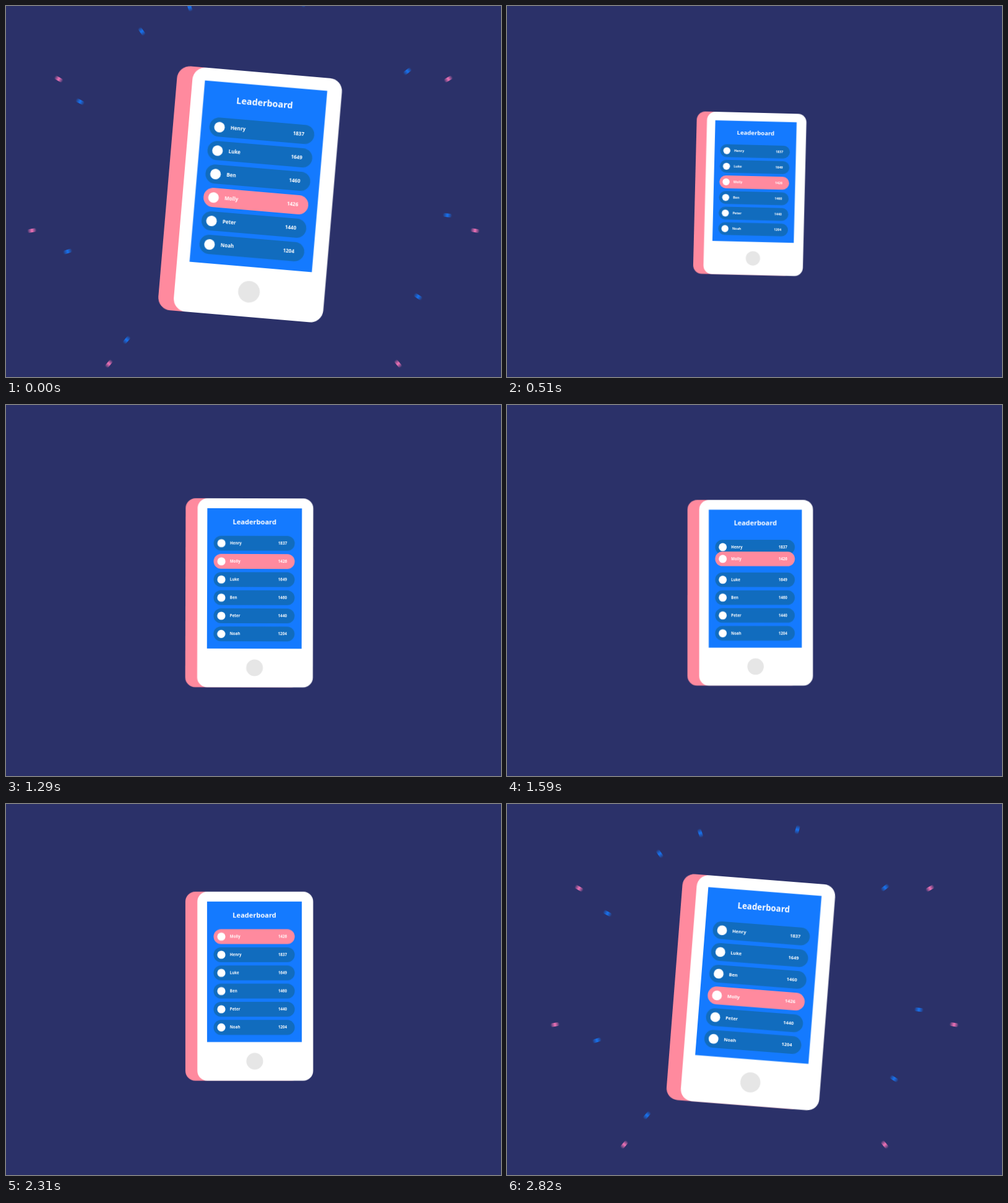
An HTML page that plays this animation: 800x600 px, repeating every 2850 ms.

```html
<!DOCTYPE html>
<html lang="en">
<head>
<meta charset="utf-8">
<title>Leaderboard</title>
<style>
  html, body { margin: 0; width: 100%; height: 100%; overflow: hidden; background: #2b3169; }
  svg { display: block; width: 800px; height: 600px; }
  text { font-family: "Open Sans", "Noto Sans", sans-serif; font-weight: 700; fill: #fff; }

  /* The cycle begins with the pop-in, 305 ms before the page's first picture. */
  .anim {
    --sine: cubic-bezier(.364, 0, .636, 1);
    animation: 2850ms var(--sine) -305ms infinite both;
  }
  .zoom, .tilt { transform-origin: 388px 303px; }
  .zoom { animation-name: zoom; }
  .tilt { animation-name: tilt; }
  .drop { animation-name: drop, smear; }
  .climb { animation-name: climb; }
  .yield1 { animation-name: yield1; }
  .yield2 { animation-name: yield2; }
  .yield3 { animation-name: yield3; }
  .pink { animation-name: flyPink; }
  .blue { animation-name: flyBlue; }

  @keyframes zoom {
    0% { transform: scale(0); }
    12.46% { transform: scale(1.36); }
    29.65% { transform: scale(.855); }
    45.79% { transform: scale(1.064); }
    61.58% { transform: scale(.975); }
    77.37% { transform: scale(1.011); }
    94.91%, 100% { transform: scale(1); }
  }
  @keyframes tilt {
    0% { transform: rotate(0deg); }
    12.81% { transform: rotate(5.2deg); animation-timing-function: cubic-bezier(.4, 0, .6, .85); }
    28.6% { transform: rotate(1.4deg); animation-timing-function: linear; }
    43.33% { transform: rotate(.65deg); animation-timing-function: linear; }
    55.96% { transform: rotate(.15deg); animation-timing-function: ease-out; }
    70.35%, 100% { transform: rotate(0deg); }
  }
  @keyframes drop {
    0%, 85.96% { transform: translateY(0); animation-timing-function: cubic-bezier(.3333, 0, .6667, -.3); }
    100% { transform: translateY(479px); }
  }
  @keyframes smear {
    0% { filter: none; animation-timing-function: step-end; }
    95.6% { filter: url(#soft); animation-timing-function: step-end; }
    98.2%, 100% { filter: url(#hard); animation-timing-function: step-end; }
  }

  @keyframes climb {
    0%, 17.37% { transform: translateY(0); }
    27.89%, 40.53% { transform: translateY(-29.35px); }
    51.05%, 63.68% { transform: translateY(-58.7px); }
    74.21%, 100% { transform: translateY(-88.05px); }
  }
  @keyframes yield1 {
    0%, 17.37% { transform: translateY(0); }
    27.89%, 100% { transform: translateY(29.35px); }
  }
  @keyframes yield2 {
    0%, 40.53% { transform: translateY(0); }
    51.05%, 100% { transform: translateY(29.35px); }
  }
  @keyframes yield3 {
    0%, 63.68% { transform: translateY(0); }
    74.21%, 100% { transform: translateY(29.35px); }
  }

  @keyframes flyPink {
    0% { transform: translateX(0); opacity: 0; animation-timing-function: step-end; }
    .6% { transform: translateX(0); opacity: 1; animation-timing-function: cubic-bezier(.333, .31, .667, 1); }
    17.23% { transform: translateX(486px); opacity: 1; animation-timing-function: step-end; }
    17.3%, 100% { transform: translateX(486px); opacity: 0; }
  }
  @keyframes flyBlue {
    0% { transform: translateX(0); opacity: 1; }
    21.05% { transform: translateX(612px); opacity: 1; animation-timing-function: step-end; }
    21.1%, 100% { transform: translateX(612px); opacity: 0; }
  }
</style>
</head>
<body>
<svg viewBox="0 0 800 600">
  <defs>
    <filter id="soft"><feGaussianBlur stdDeviation="0 3"/></filter>
    <filter id="hard"><feGaussianBlur stdDeviation="0 5.5"/></filter>
    <linearGradient id="pinkFade">
      <stop offset="0" stop-color="#f272b6" stop-opacity=".1"/>
      <stop offset=".5" stop-color="#f272b6"/>
      <stop offset="1" stop-color="#f272b6" stop-opacity=".1"/>
    </linearGradient>
    <linearGradient id="blueFade">
      <stop offset="0" stop-color="#147aff" stop-opacity=".1"/>
      <stop offset=".5" stop-color="#147aff" stop-opacity=".9"/>
      <stop offset="1" stop-color="#147aff" stop-opacity=".1"/>
    </linearGradient>
  </defs>

  <rect width="800" height="600" fill="#2b3169"/>
  <g id="confetti" transform="translate(400 300)"></g>

  <g class="anim drop">
    <g class="anim tilt">
      <g class="anim zoom">
        <rect x="290" y="151" width="187" height="305.5" rx="16" fill="#ff8a9e"/>
        <rect x="309.3" y="151" width="187" height="305.5" rx="16" fill="#fff"/>
        <rect x="325" y="167" width="153" height="227" fill="#147aff"/>
        <text x="401.5" y="193" font-size="11.1" text-anchor="middle">Leaderboard</text>
        <g id="rows"></g>
        <circle cx="402" cy="425" r="13.5" fill="#e6e6e6"/>
      </g>
    </g>
  </g>
</svg>
<script>
  const PITCH = 29.35;

  // slot, name, score, motion; the climbing row comes last so it stays on top
  const players = [
    [0, "Henry", 1837, "yield3"],
    [1, "Luke", 1649, "yield2"],
    [2, "Ben", 1460, "yield1"],
    [4, "Peter", 1440, ""],
    [5, "Noah", 1204, ""],
    [3, "Molly", 1426, "climb"]
  ];

  const row = ([slot, name, score, motion]) => `
    <g transform="translate(0 ${223.6 + slot * PITCH})">
      <g class="${motion && "anim " + motion}">
        <rect x="335.5" y="-12" width="131" height="24" rx="12" fill="${motion === "climb" ? "#ff8a9e" : "#116cbe"}"/>
        <circle cx="348" r="6.6" fill="#fff"/>
        <text x="361.8" y="2" font-size="6.2">${name}</text>
        <text x="454" y="2" font-size="6.2" text-anchor="end">${score}</text>
      </g>
    </g>`;

  const fleck = color => angle => `
    <g transform="rotate(${angle})">
      <rect class="anim ${color}" x="-7" y="-3" width="14" height="6" rx="3" fill="url(#${color}Fade)"/>
    </g>`;

  const pinkAngles = Array.from({ length: 9 }, (_, i) => 10 + 40 * i);
  const blueAngles = [7, 32.6, 130.5, 162.1, 207.4, 235.1, 250.9, 285, 322];

  document.getElementById("rows").innerHTML = players.map(row).join("");
  document.getElementById("confetti").innerHTML =
    pinkAngles.map(fleck("pink")).join("") + blueAngles.map(fleck("blue")).join("");
</script>
</body>
</html>
```
